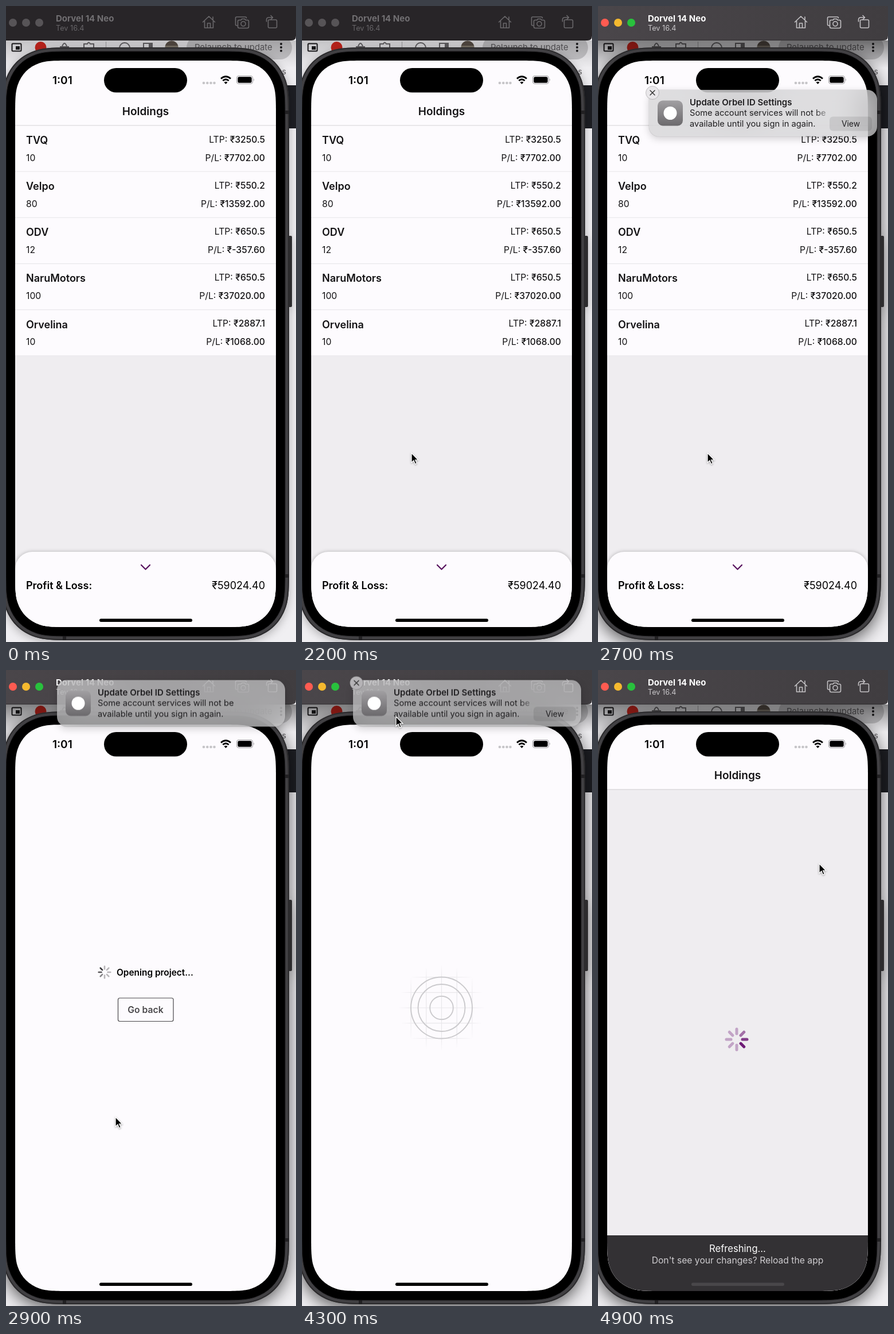
Write an HTML page that moves like this. It is 506 by 1107 pixels and loops after 5000 ms.

```html
<!DOCTYPE html>
<html lang="en">
<head>
<meta charset="utf-8">
<title>Holdings</title>
<style>
html, body { margin: 0; width: 100%; height: 100%; overflow: hidden; background: #f0eff2; }
svg { position: absolute; left: 0; top: 0; overflow: visible; font-family: Inter, Roboto, sans-serif; }
.b { font-weight: 600; }
.m { font-weight: 500; }
.end { text-anchor: end; }
.mid { text-anchor: middle; }
.t15 { font-size: 15.7px; }
.t18 { font-size: 18px; }
.t19 { font-size: 19px; }
.line { fill: none; stroke-linecap: round; stroke-linejoin: round; }
#phone { filter: drop-shadow(0 4px 8px rgba(0, 0, 0, .28)); }
#phone.on { filter: drop-shadow(0 8px 14px rgba(0, 0, 0, .6)); }
#bar { --title: #716f72; --sub: #676568; --icon: #6a686b; }
#bar.on { --title: #fff; --sub: #c9c7ca; --icon: #c3c1c4; }
#banner { position: absolute; left: 89px; top: 0; width: 398px; height: 81px; border-radius: 17px;
  background: rgba(207, 206, 208, .68); backdrop-filter: blur(26px);
  box-shadow: 0 0 1px rgba(0, 0, 0, .5), 0 4px 14px rgba(0, 0, 0, .18); }
</style>
</head>
<body>
<svg width="506" height="1107" viewBox="0 0 506 1107">
  <defs>
    <clipPath id="screenClip"><path id="screen"/></clipPath>
    <linearGradient id="shade" x2="0" y2="1">
      <stop stop-color="#000" stop-opacity=".5"/><stop offset="1" stop-color="#000" stop-opacity="0"/>
    </linearGradient>
    <linearGradient id="title" x2="1"><stop stop-color="#4a464a"/><stop offset="1" stop-color="#403d40"/></linearGradient>
    <radialGradient id="fade"><stop offset=".7" stop-color="#fff"/><stop offset="1" stop-color="#000"/></radialGradient>
    <mask id="gridMask"><circle cx="243.5" cy="588" r="76" fill="url(#fade)"/></mask>
  </defs>

  <!-- browser window behind -->
  <rect width="506" height="140" fill="#eeedf0"/>
  <rect x="315" y="52" width="184" height="41" rx="20.5" fill="#c6c5c8"/>
  <rect x="10.5" y="65.5" width="16" height="13" rx="1.5" fill="none" stroke="#1d1c1e" stroke-width="2"/>
  <rect x="17" y="70" width="7" height="6" fill="#1d1c1e"/>
  <circle cx="60.5" cy="72" r="10" fill="#d5281f"/>
  <g fill="none" stroke="#6b696c" stroke-width="2">
    <path d="M94 71h16M98 70q4-10 8 0"/>
    <path d="M136 78v-12h6q2-5 5 0h6v12"/>
    <circle cx="207" cy="73" r="9"/>
    <path d="M240 78v-13h15v13"/>
  </g>
  <path d="M174.5 62v16" stroke="#a9a8ab"/>
  <rect x="249" y="65" width="6" height="13" fill="#6b696c"/>
  <circle cx="289" cy="72" r="11.5" fill="#857d70"/>
  <path d="M278 69a11.5 11.5 0 0 1 22 0z" fill="#5b5149"/>
  <text x="329" y="77" font-size="14.9" fill="#5b595c">Relaunch to update</text>
  <g fill="#1d1c1e"><circle cx="480" cy="66" r="2"/><circle cx="480" cy="72" r="2"/><circle cx="480" cy="78" r="2"/></g>
  <text x="481.5" y="119" font-size="14" fill="#5b595c">s</text>
  <rect x="400" y="138" width="106" height="75" fill="#1d1e23"/>
  <rect id="shadow" y="60" width="506" height="48" fill="url(#shade)"/>

  <!-- phone -->
  <g id="phone">
    <rect x="492" y="400" width="7" height="124" rx="2" fill="#2d2c2e"/>
    <path id="frame" fill="#414043"/>
  </g>
  <path id="rim" fill="none" stroke="#2b2a2c" stroke-width="2"/>
  <path d="M487 185h7M487 992h7M102 1097v7" stroke="#222123" stroke-width="6"/>
  <path id="bezel" stroke="#1c1b1d"/>

  <g clip-path="url(#screenClip)">
    <rect x="16" y="95" width="455" height="986" fill="#fdfbfe"/>
    <g id="holdings">
      <text class="mid b t19" x="243.5" y="189.5" fill="#151416">Holdings</text>
      <rect x="16" y="208" width="455" height="873" fill="#efedf0"/>
      <rect x="16" y="207.5" width="455" height="1" fill="#cdccd0"/>
    </g>
    <g id="list">
      <g id="rows"></g>
      <rect x="16" y="950" width="455" height="160" rx="30" fill="#fdfbfe" style="filter:drop-shadow(0 0 3px rgba(0,0,0,.25))"/>
      <path class="line" d="M236 973l7.5 7.500 7.5-7.500" stroke="#5a1560" stroke-width="2.3"/>
      <text class="b t18" x="35" y="1014.5">Profit &amp; Loss:</text>
      <text class="end t18" x="452" y="1014.5">₹59024.40</text>
    </g>
    <g id="opening">
      <g id="smallSpin"></g>
      <text class="b" x="193" y="532" font-size="15.4">Opening project...</text>
      <rect x="195.5" y="571" width="96.5" height="40.5" rx="3" fill="none" stroke="#49474a" stroke-width="1.2"/>
      <text class="mid b t15" x="243.5" y="597" fill="#49474a">Go back</text>
    </g>
    <g id="splash" fill="none">
      <path id="grid" stroke="#e9e8eb" stroke-width="1.2" mask="url(#gridMask)"/>
      <g stroke="#cbcacd" stroke-width="1.9">
        <circle cx="243.5" cy="588" r="53.5"/><circle cx="243.5" cy="588" r="41"/><circle cx="243.5" cy="588" r="20.3"/>
      </g>
    </g>
    <g id="refresh">
      <g id="bigSpin"></g>
      <rect x="16" y="984" width="455" height="97" fill="#333134"/>
      <text class="mid" x="243.5" y="1012.5" font-size="16.6" fill="#fff">Refreshing...</text>
      <text class="mid t15" x="243.5" y="1032.5" fill="#cfcdd0">Don't see your changes? Reload the app</text>
    </g>
    <rect id="home" x="163" y="1066.5" width="162" height="5.5" rx="2.7"/>
  </g>

  <!-- status bar -->
  <text class="b t19" x="81" y="135.5">1:01</text>
  <rect x="171" y="108" width="145" height="42.5" rx="21.2"/>
  <g fill="#c6c5c8">
    <circle cx="345" cy="134" r="2.3"/><circle cx="351.3" cy="134" r="2.3"/>
    <circle cx="357.5" cy="134" r="2.3"/><circle cx="363.5" cy="134" r="2.3"/>
  </g>
  <path d="M375 126.5q8.500-7.500 17 0M378.300 130q5.200-4.500 10.400 0" fill="none" stroke="#000" stroke-width="2.7"/>
  <path d="M380.5 132.8q3-2.300 6 0l-3 3.200z"/>
  <rect x="402.5" y="121.5" width="28" height="14" rx="4.3" fill="none" stroke="#a5a4a7" stroke-width="1.2"/>
  <rect x="404.3" y="123.3" width="24.4" height="10.4" rx="2.8"/>
  <path d="M432 126.3q2 2.200 0 4.400z" fill="#a5a4a7"/>

  <!-- simulator title bar -->
  <g id="bar">
    <path id="barBack" d="M0 0H506V52q0 8-8 8H0z"/>
    <path d="M0 59.5H498" stroke="#000" stroke-opacity=".3"/>
    <circle class="light" cx="12" cy="29" r="7"/><circle class="light" cx="35" cy="29" r="7"/><circle class="light" cx="58" cy="29" r="7"/>
    <text x="87" y="27" font-size="15" font-weight="700" fill="var(--title)">Dorvel 14 Neo</text>
    <text x="87" y="43" font-size="12.7" fill="var(--sub)">Tev 16.4</text>
    <g class="line" stroke="var(--icon)" stroke-width="1.6">
      <path d="M343.5 28L354 18l10.500 10M361 24v-5M346.500 26v12h15V26M351.500 38v-8h5v8"/>
      <path d="M404 34h-1.500q-2 0-2-2V21q0-2 2-2h15q2 0 2 2"/>
      <path d="M407 24.5h3l1.500-2h5l1.500 2h3q2.500 0 2.500 2v9.500q0 2.500-2.500 2.500h-14q-2.500 0-2.500-2.500v-9.500q0-2 2.500-2z"/>
      <circle cx="414" cy="31" r="4"/>
      <rect x="457.5" y="24" width="15" height="14" rx="2"/>
      <path d="M454.5 27v-3q0-4 4-4h6M462 16.500l3.500 3.500-3.500 3.500"/>
    </g>
  </g>
</svg>

<div id="banner">
  <svg width="398" height="81" viewBox="89 0 398 81">
    <defs>
      <linearGradient id="tile" x2="0" y2="1"><stop stop-color="#a19fa2"/><stop offset="1" stop-color="#6c6a6d"/></linearGradient>
      <linearGradient id="textFade" gradientUnits="userSpaceOnUse" x1="378" x2="402">
        <stop stop-color="#1f1e20"/><stop offset="1" stop-color="#1f1e20" stop-opacity=".2"/>
      </linearGradient>
    </defs>
    <rect x="104" y="18.5" width="44" height="44" rx="9" fill="url(#tile)"/>
    <circle cx="126" cy="40.5" r="11.5" fill="#fff"/>
    <text class="b" x="160" y="26.5" font-size="15" fill="#1f1e20">Update Orbel ID Settings</text>
    <g id="body" font-size="14.7">
      <text x="160" y="45">Some account services will not be</text>
      <text x="160" y="63.5">available until you sign in again.</text>
    </g>
    <g id="buttons">
      <rect x="404" y="46.5" width="74" height="25" rx="6" fill="#000" fill-opacity=".09"/>
      <text class="mid" x="441" y="64" font-size="13.9" fill="#1f1e20">View</text>
      <circle id="close" cx="95" cy="5" r="11.5" stroke="#000" stroke-opacity=".2"/>
      <path class="line" d="M91 1l8 8M99 1l-8 8" stroke="#333" stroke-width="1.5"/>
    </g>
  </svg>
</div>

<svg width="506" height="1107" viewBox="0 0 506 1107">
  <path id="cursor" d="M0 0V16.8L3.900 13.200 6.500 19.300 9.200 18.100 6.700 12.200H12z" stroke="#fff" stroke-width="1.3"
    style="filter:drop-shadow(0 1.5px 1.5px rgba(0,0,0,.35))"/>
</svg>

<script>
const LOOP = 5000, STEP = 100;
const $ = id => document.getElementById(id);
const show = (id, on) => $(id).style.display = on ? '' : 'none';

// Rectangle with continuous-curvature corners; each corner runs along its edge for 1.53 r
const CORNER = [[1.53, 0], [1.09, 0], [.87, 0], [.67, .066], [.37, .169], [.169, .37], [.066, .67], [0, .87], [0, 1.09], [0, 1.53]];
function squircle(id, left, top, right, bottom, r) {
  const corner = (x, y, sx, sy) => {
    const pts = CORNER.map(([u, v]) => `${x + sx * u * r} ${y + sy * v * r}`);
    if (sx === sy) pts.reverse();
    return `${pts[0]}C${pts.slice(1)}`;
  };
  $(id).setAttribute('d', 'M' + [
    corner(left, top, 1, 1), corner(right, top, -1, 1), corner(right, bottom, -1, -1), corner(left, bottom, 1, -1),
  ].join('L') + 'z');
}
squircle('frame', -7, 72, 494, 1104, 86);
squircle('rim', -6, 73, 493, 1103, 85);
squircle('bezel', 0, 79, 487, 1097, 79);
squircle('screen', 16, 95, 471, 1081, 64);

const holdings = [
  ['TVQ', 10, '3250.5', '7702.00'],
  ['Velpo', 80, '550.2', '13592.00'],
  ['ODV', 12, '650.5', '-357.60'],
  ['NaruMotors', 100, '650.5', '37020.00'],
  ['Orvelina', 10, '2887.1', '1068.00'],
];
const value = (label, amount, y) =>
  `<text class="end t15" x="452" y="${y}">${label}: <tspan class="m">₹${amount}</tspan></text>`;
$('rows').innerHTML = holdings.map(([name, count, price, profit], i) => `
  <g transform="translate(0 ${208.5 + i * 80.2})" fill="#131214">
    <rect x="16" width="455" height="80" fill="#fdfbfe"/>
    <rect x="16" y="79" width="455" height="1.2" fill="#e8e6ea"/>
    <text class="b t18" x="35" y="31.3">${name}</text>
    <text class="t15" x="35" y="61">${count}</text>
    ${value('LTP', price, 29)}${value('P/L', profit, 61)}
  </g>`).join('');

$('grid').setAttribute('d', [-2, -1, 0, 1, 2].map(i => {
  const d = i * 26.7;
  return `M${243.5 + d} 514v148M169.5 ${588 + d}h148`;
}).join(''));

function makeSpinner(id, x, y, inner, outer, width, color) {
  $(id).innerHTML = Array.from({ length: 8 }, (_, i) =>
    `<path class="line" d="M0 ${-inner}V${-outer}" stroke="${color}" stroke-width="${width}"
      transform="translate(${x} ${y}) rotate(${i * 45})"/>`).join('');
}
makeSpinner('smallSpin', 172, 526, 5.5, 10.3, 2.6, '#39373a');
makeSpinner('bigSpin', 242, 643, 10, 18, 5, '#6f1c77');

function spin(id, t) {
  const head = Math.floor(t / STEP) + 2;
  [...$(id).children].forEach((spoke, i) => {
    const age = (head - i + 8) % 8;
    spoke.style.opacity = [1, .85, .6][age] || .35;
  });
}

// Piecewise linear path through [time, ...values]
function track(keys, t) {
  const next = keys.findIndex(k => k[0] > t);
  if (next < 0) return keys.at(-1).slice(1);
  if (!next) return keys[0].slice(1);
  const a = keys[next - 1], b = keys[next], u = (t - a[0]) / (b[0] - a[0]);
  return a.slice(1).map((v, i) => v + (b[i + 1] - v) * u);
}
const pointer = [
  [600, 19, 941], [900, 19, 941], [1200, 175, 711], [1600, 186, 755], [2200, 191, 778],
  [3500, 191, 778], [3600, 207, 745], [4200, 166, 100], [4300, 164, 81], [4400, 164, 62],
  [4700, 400, 62], [4800, 409, 240], [4900, 386, 337],
];
const bannerPath = [
  [2500, 300, 146], [2600, 0, 146], [2700, 0, 146], [2900, 0, 17.5], [4400, 0, 17.5], [4700, 420, 17.5],
];
const lights = ['#ff5b51', '#f5b92f', '#29c13d'];

function draw(t) {
  const active = t >= 2500, hover = t < 2900 || t >= 4200;
  const screen = t < 2900 ? 'list' : t < 3800 ? 'opening' : t < 4600 ? 'splash' : 'refresh';
  for (const id of ['list', 'opening', 'splash', 'refresh']) show(id, id === screen);
  show('holdings', screen === 'list' || screen === 'refresh');
  $('home').style.fill = screen === 'refresh' ? '#49474a' : '#000';
  spin('smallSpin', t);
  spin('bigSpin', t);

  $('bar').classList.toggle('on', active);
  $('phone').classList.toggle('on', active);
  $('barBack').style.fill = active ? 'url(#title)' : '#282528';
  document.querySelectorAll('.light').forEach((c, i) => c.style.fill = active ? lights[i] : '#575457');
  $('shadow').style.opacity = active ? .9 : .35;

  show('banner', active && t < 4700);
  const [bx, by] = track(bannerPath, t);
  $('banner').style.transform = `translate(${bx}px, ${by}px)`;
  show('buttons', hover);
  $('body').style.fill = hover ? 'url(#textFade)' : '#1f1e20';
  $('close').style.fill = by > 80 ? '#e9e7ea' : '#b5b3b6';

  show('cursor', t >= 600);
  const [cx, cy] = track(pointer, t);
  $('cursor').setAttribute('transform', `translate(${cx} ${cy})`);
}

const start = performance.now();
function tick() {
  const t = (performance.now() - start) % LOOP;
  draw(Math.floor(t / STEP) * STEP);
  requestAnimationFrame(tick);
}
tick();
</script>
</body>
</html>
```
